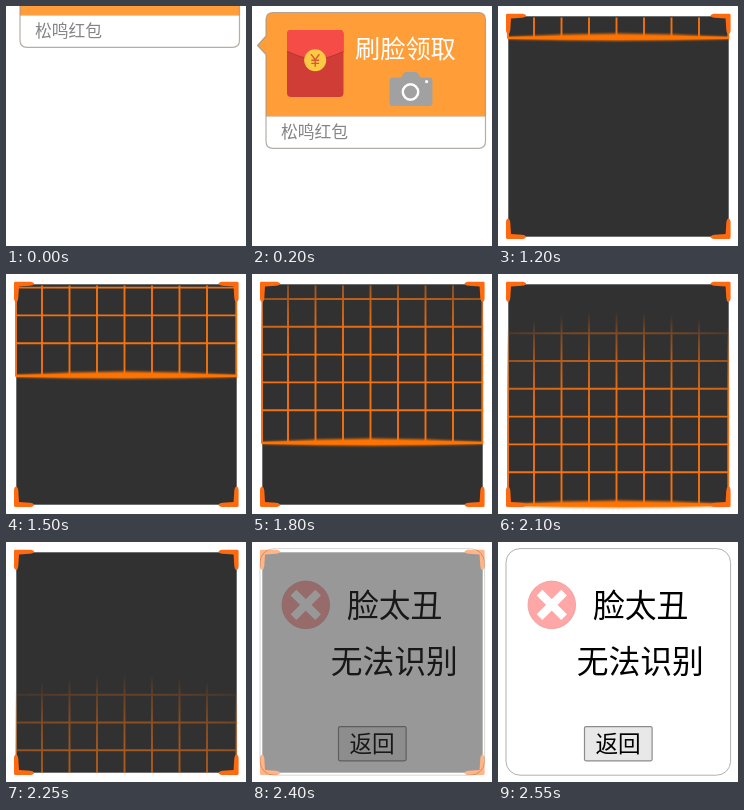
Write an HTML page that moves like this. It is 240 px wide and 240 px high and loops after 4.55 s.

```html
<!DOCTYPE html>
<html lang="zh-CN">
<head>
<meta charset="utf-8">
<title>刷脸领取</title>
<style>
  html, body { margin: 0; width: 100%; height: 100%; overflow: hidden; background: #fff; }
  svg { display: block; width: 100vw; height: 100vh; }
  text { font-family: "Noto Sans CJK SC", "Noto Sans CJK", "Noto Sans", sans-serif; }
</style>
</head>
<body>
<svg viewBox="0 0 240 240">
  <defs>
    <clipPath id="panelClip"><rect x="8" y="11.5" width="225" height="219.5"/></clipPath>
    <radialGradient id="fade" gradientUnits="userSpaceOnUse" cx="0" cy="0" r="1" gradientTransform="translate(120.3 0) scale(300 200)">
      <stop offset=".48" stop-color="#fff"/>
      <stop offset=".58" stop-color="#eee"/>
      <stop offset=".72" stop-color="#bbb"/>
      <stop offset=".86" stop-color="#666"/>
      <stop offset=".97" stop-color="#000"/>
    </radialGradient>
    <mask id="trail" maskUnits="userSpaceOnUse" x="0" y="-330" width="240" height="340">
      <rect y="-330" width="240" height="340" fill="url(#fade)"/>
    </mask>
    <filter id="glow" filterUnits="userSpaceOnUse" x="0" y="-20" width="240" height="40">
      <feGaussianBlur stdDeviation="1.3"/>
    </filter>
    <clipPath id="envelope"><rect x="35" y="24" width="56.5" height="67" rx="4"/></clipPath>
    <path id="corner" d="M8 9Q8 7.7 9.3 7.7H25Q28.3 8.4 28 10Q27 11.6 24 11.8L13 12.5L12.3 24Q12 27 10.5 28Q8.5 28.3 8 25Z"/>
  </defs>

  <g id="bubble">
    <rect x="14" y="6.5" width="219.5" height="135.8" rx="7" fill="#fff"/>
    <path d="M14 110V30L5.5 39.5L14 48.5V13.5Q14 6.5 21 6.5H226.5Q233.5 6.5 233.5 13.5V110Z" fill="#ff9e39"/>
    <path d="M14 110.4H233.5" stroke="#d8b48c" stroke-width=".8"/>
    <path d="M14 48.5V135.3Q14 142.3 21 142.3H226.5Q233.5 142.3 233.5 135.3V13.5Q233.5 6.5 226.5 6.5H21Q14 6.5 14 13.5V30L5.5 39.5Z"
      fill="none" stroke="#9c9389" stroke-opacity=".75" stroke-width="1.2"/>
    <g clip-path="url(#envelope)">
      <rect x="35" y="24" width="57" height="67" fill="#cf3d36"/>
      <path d="M35 24H92V45Q63.5 60 35 45Z" fill="#f54c48"/>
      <path d="M35 45.4Q63.5 60.4 92 45.4" fill="none" stroke="#b93530" stroke-width="1"/>
    </g>
    <circle cx="63.2" cy="54.3" r="11" fill="#fcc945"/>
    <path d="M59 48.3L63.2 53.6L67.4 48.3M63.2 53.6V60.8M59.3 54.2H67.1M59.3 57.4H67.1"
      fill="none" stroke="#d8582f" stroke-width="1.4"/>
    <text x="103" y="52" font-size="25.2" fill="#fff">刷脸领取</text>
    <path d="M140.5 71.5H149L152 66.8Q152.6 66 154 66H163.5Q165 66 165.6 66.8L168.5 71.5H177.5Q180.5 71.5 180.5 74.5V97Q180.5 100 177.5 100H140.5Q137.5 100 137.5 97V74.5Q137.5 71.5 140.5 71.5Z" fill="#a1a1a1"/>
    <circle cx="158.5" cy="86" r="7.7" fill="none" stroke="#fff" stroke-width="2.4"/>
    <circle cx="174.6" cy="75.6" r="1.6" fill="#fff"/>
    <text x="29" y="131.5" font-size="16.8" fill="#858585">松鸣红包</text>
  </g>

  <g id="scanner">
    <rect x="10.3" y="10.3" width="220.4" height="220.4" fill="#313131"/>
    <g clip-path="url(#panelClip)">
      <g id="grid"><path id="lines" mask="url(#trail)" fill="none" stroke="#f47110" stroke-width="1.9"/></g>
    </g>
    <g id="beam">
      <path d="M10 -1Q120 -8 231 -1V1Q120 4.5 10 1Z" fill="#ff7300" filter="url(#glow)"/>
      <path d="M9.5 -1.2Q120 -3.2 231 -1.2V1Q120 2.4 9.5 1Z" fill="#ff7300"/>
    </g>
    <g id="corners" fill="#ff6a10"></g>
  </g>

  <g id="result">
    <rect width="240" height="240" fill="#fff"/>
    <rect x="8" y="6.6" width="224.6" height="226.6" rx="14" fill="#fff" stroke="#b0b0b0" stroke-width="1"/>
    <circle cx="53.8" cy="62.9" r="23.8" fill="#ffa6a6" stroke="#e6a0a0" stroke-width=".8"/>
    <path d="M41.5 50.6L66.1 75.2M66.1 50.6L41.5 75.2" stroke="#fff" stroke-width="8"/>
    <text x="95" y="74.6" font-size="31.8">脸太丑</text>
    <text x="78.7" y="130.7" font-size="31.8">无法识别</text>
    <rect x="86.5" y="184.6" width="67.6" height="34.2" rx="1.5" fill="#e8e8e8" stroke="#8c8c8c" stroke-width="1.2"/>
    <text x="97.5" y="210.3" font-size="22.6">返回</text>
  </g>
</svg>
<script>
  const LOOP = 4550, SCAN_START = 1200, STEP = 150, RESULT_START = 2400;
  const BUBBLE_Y = [-101, -50, 0];
  const BEAM_Y = [32, 72, 102, 137, 169, 201, 231, 324.5];
  const PITCH = 27.8;
  const el = id => document.getElementById(id);
  const show = (id, on) => el(id).setAttribute('display', on ? 'inline' : 'none');
  const moveY = (id, y) => el(id).setAttribute('transform', `translate(0 ${y})`);

  // The grid hangs above the beam and travels with it.
  function gridPath() {
    const columns = [10, 230.3];
    for (let i = 0; i < 7; i++) columns.push(36 + i * 27.5);
    let d = columns.map(x => `M${x} -330V0`).join('');
    for (let i = 0; i < 8; i++) d += `M9.5 ${-32.8 - i * PITCH}H231`;
    return d;
  }
  el('lines').setAttribute('d', gridPath());
  el('corners').innerHTML = [[1, 1], [-1, 1], [1, -1], [-1, -1]].map(([sx, sy]) =>
    `<use href="#corner" transform="translate(120.3 120.3) scale(${sx} ${sy}) translate(-120.3 -120.3)"/>`).join('');

  function draw(t) {
    const scanning = t >= SCAN_START && t < RESULT_START + STEP;
    show('bubble', t < SCAN_START);
    show('scanner', scanning);
    show('result', t >= RESULT_START);
    if (t < SCAN_START) moveY('bubble', BUBBLE_Y[Math.min(2, Math.floor(t / 100))]);
    if (scanning) {
      const y = BEAM_Y[Math.floor((t - SCAN_START) / STEP)];
      show('grid', y !== undefined);
      show('beam', y < 240);
      if (y !== undefined) {
        moveY('grid', y);
        moveY('beam', y);
        // The trail dims once the beam has left the panel.
        el('grid').setAttribute('opacity', y < 240 ? 1 : 0.65);
      }
    }
    el('result').setAttribute('opacity', t < RESULT_START + STEP ? 0.5 : 1);
  }

  const start = performance.now();
  function tick() {
    draw((performance.now() - start) % LOOP);
    requestAnimationFrame(tick);
  }
  tick();
</script>
</body>
</html>
```
